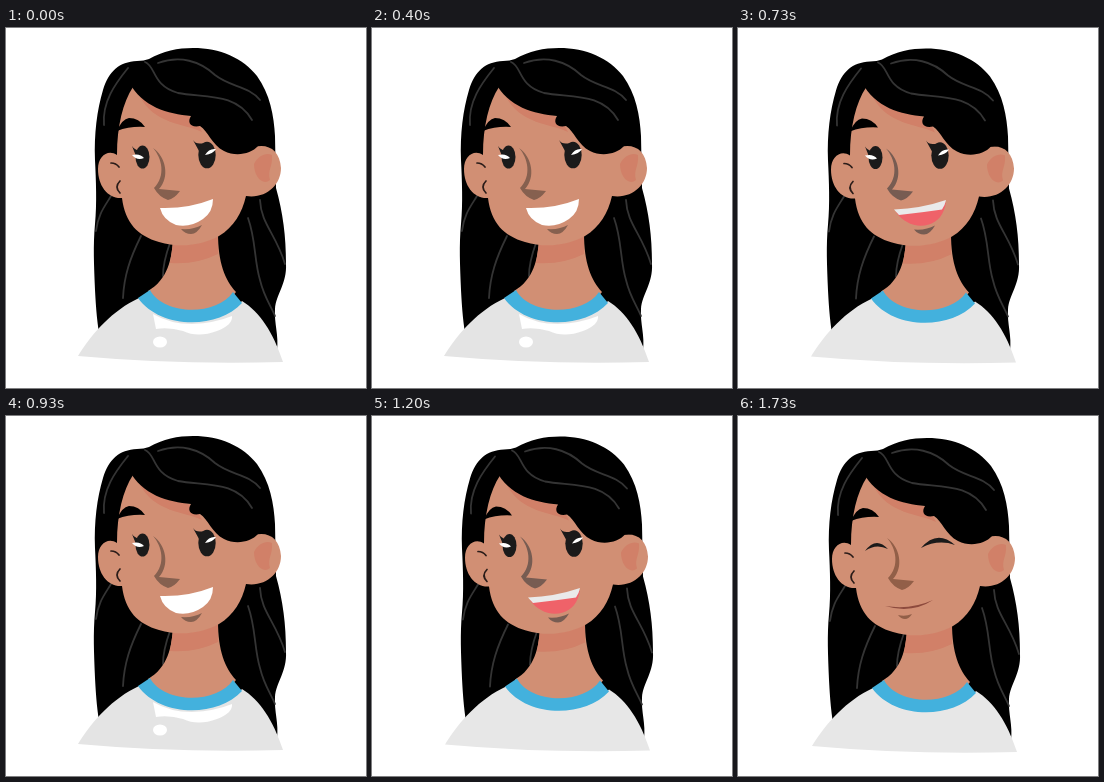
An HTML page that plays this animation: 360x360 px, repeating every 1.99 s.

```html
<!DOCTYPE html>
<html lang="en">
<head>
<meta charset="utf-8">
<title>Smiling woman</title>
<style>
  html, body { margin: 0; width: 100%; height: 100%; overflow: hidden; background: #fff; }
  svg { display: block; width: 100vw; height: 100vh; }
  .skin { fill: #d18f74; }
  .shade { fill: #d18068; }
  .brown { fill: var(--brown); }
  .ink { fill: #1b1a1a; }
  .white { fill: #fff; }
  .line { fill: none; stroke-linecap: round; stroke-linejoin: round; }
  .strand { stroke: #343434; stroke-width: 1.8; }
  .pose { visibility: hidden; }
  .pose.on { visibility: visible; }
</style>
</head>
<body>
<svg viewBox="0 0 360 360">
  <g id="figure">
    <!-- hair behind -->
    <path d="M95 316C91 296 90 280 89 262C88 236 87 218 89 196C91 176 90 152 89 132C88 106 91 82 97 62C103 43 113 34 131 33Q138 33 143 31C157 23 172 20 187 20C214 20 237 30 251 48C264 66 268 88 269 108L270 160C277 185 280 208 280 236C281 256 270 266 269 281C268 295 273 308 271 322Z"/>
    <g class="line strand">
      <path d="M105 168C99 178 92 186 90 203"/>
      <path d="M135 208C124 230 118 248 117 270"/>
      <path d="M164 215C160 226 157 236 157 248"/>
      <path d="M242 190C250 212 248 232 254 252C258 269 265 278 269 288"/>
      <path d="M254 172C255 196 270 206 279 236"/>
    </g>

    <!-- neck and shirt -->
    <path class="skin" d="M167 205C167 232 161 252 142 263C160 290 212 290 230 264C219 252 212 235 212 205Z"/>
    <path class="shade" d="M167 215Q191 219 212 207L212 226Q190 237 164 235Z"/>
    <path id="shirt" d="M72 328C86 305 107 282 133 270C154 298 214 299 236 273C254 284 267 304 277 334Q172 337 72 328Z"/>
    <path d="M144 262C158 288 211 288 227 264L236 275C211 302 154 301 132 270Z" fill="#43b1dd"/>

    <!-- face -->
    <path class="skin" d="M127 59C117 74 111 98 111 127C102 121 92 128 92 141C92 158 102 171 116 170C119 195 132 208 153 214C176 221 198 216 213 208C228 199 236 185 240 168C260 171 275 157 275 140C274 122 262 115 248 119L244 90L170 70Z"/>
    <path class="shade" d="M248 136C252 127 261 124 266 127C267 139 261 142 264 152C257 158 248 149 248 136Z"/>
    <path class="shade" d="M133 67C151 87 178 83 190 92L196 104C178 95 148 97 133 67Z"/>

    <!-- fringe -->
    <path d="M123 54C136 79 162 86 185 88C181 94 184 100 194 98C202 103 206 117 218 123C230 129 245 126 252 118L267 117C267 80 245 35 195 27C160 22 126 34 123 54Z"/>
    <g class="line strand">
      <path d="M98 97C96 74 109 56 122 40"/>
      <path d="M139 34C150 38 146 58 172 65C197 70 230 64 246 92"/>
      <path d="M152 35C174 27 194 33 209 47C224 59 243 58 254 72"/>
    </g>
    <path class="line" d="M105 135Q110 135 113 139M114 153Q108 159 114 165" stroke="#2a1c19" stroke-width="1.7"/>
    <path d="M111 103Q116 91 123 90Q133 90 139 99Q124 98 111 103Z"/>
    <path class="brown" d="M147 120C160 129 164 149 153 161L174 163Q168 171 162 172Q153 169 148 160C160 148 156 130 147 120Z"/>

    <g id="openEyes" class="pose">
      <path class="ink" d="M126 118Q129 123 135 122L130 128ZM187 112Q190 117 198 115L193 123Z"/>
      <ellipse class="ink" cx="136.5" cy="129" rx="7" ry="11.5"/>
      <ellipse class="ink" cx="201" cy="127" rx="8.7" ry="13.3"/>
      <path class="white" d="M126 127Q134 125 138 130Q131 133 126 127ZM199 127Q203 120 210 121Q207 126 199 127Z"/>
    </g>
    <g id="closedEyes" class="pose ink">
      <path d="M125 133Q136 118 148 131Q136 125 125 133Z"/>
      <path d="M181 130Q197 111 215 127Q198 121 181 130Z"/>
    </g>

    <path id="chin" class="pose brown" d="M175 201Q187 202 196 197Q191 206 185 206Q179 206 175 201Z"/>
    <path id="grin" class="pose white" d="M154 180Q182 181 207 171Q207 184 197 191Q184 200 170 197Q157 192 154 180Z"/>
    <g id="talk" class="pose">
      <path d="M157 184Q183 185 207 174C205 186 199 193 190 196C177 200 165 194 157 184Z" fill="#ef6269"/>
      <path d="M155 181Q182 180 207 171.5Q206 177 203 181Q183 184 160 186.5Z" fill="#eaeaea"/>
    </g>
    <g id="smile" class="pose">
      <path d="M145 188Q171 192 193 182Q172 196 145 188Z" fill="#8d4a3d"/>
      <path class="brown" d="M158 197Q165 199 172 196Q169 201 165 201Q161 201 158 197Z"/>
    </g>
    <g id="glints" class="pose white">
      <path d="M147 286Q164 296 186 296Q209 295 226 288Q227 297 211 303Q192 310 177 303Q163 299 150 301Z"/>
      <ellipse cx="154" cy="314" rx="7" ry="5.5"/>
    </g>
  </g>
</svg>
<script>
  const LOOP = 1990, STEP = 200 / 3;
  const get = id => document.getElementById(id);
  const poses = {
    grin: { show: ['openEyes', 'chin', 'grin', 'glints'], x: 0, y: 0, shirt: '#e4e4e4', brown: '#86604f' },
    talk: { show: ['openEyes', 'chin', 'talk'], x: 1, y: 0.5, shirt: '#e7e7e7', brown: '#775c52' },
    smile: { show: ['closedEyes', 'smile'], x: 2, y: 2, shirt: '#e7e7e7', brown: '#925f48' }
  };
  // first step of each held pose
  const cues = [[0, 'grin'], [7, 'talk'], [12, 'grin'], [17, 'talk'], [24, 'smile']];
  const parts = document.querySelectorAll('.pose');
  let current;

  function setPose(name) {
    if (name === current) return;
    current = name;
    const pose = poses[name], figure = get('figure');
    parts.forEach(part => part.classList.toggle('on', pose.show.includes(part.id)));
    figure.setAttribute('transform', `translate(${pose.x} ${pose.y})`);
    figure.style.setProperty('--brown', pose.brown);
    get('shirt').setAttribute('fill', pose.shirt);
  }

  function draw(now) {
    const step = Math.floor((now % LOOP) / STEP + 0.06);
    setPose(cues.filter(cue => cue[0] <= step).pop()[1]);
  }

  const start = performance.now();
  function tick() {
    draw(performance.now() - start);
    requestAnimationFrame(tick);
  }
  tick();
</script>
</body>
</html>
```
